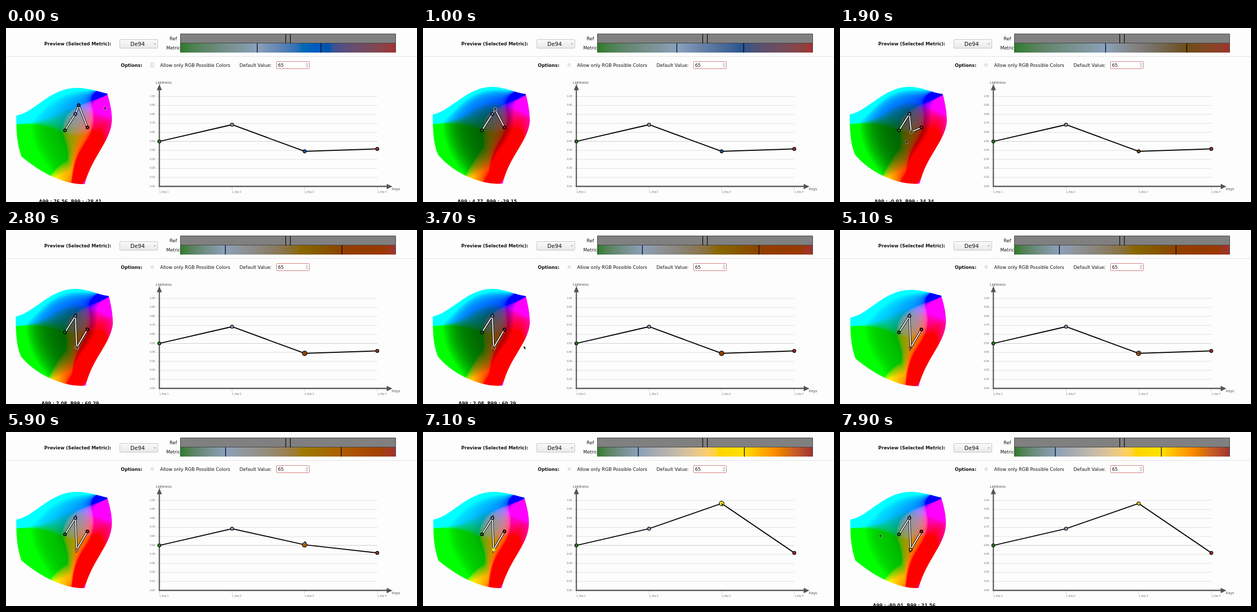
Write an HTML page with a canvas that moves like this. It is 800x340 px and loops after 8 s.

```html
<!DOCTYPE html>
<html lang="en">
<head>
<meta charset="utf-8">
<title>Colour path editor</title>
<style>
  html, body { margin: 0; width: 800px; height: 340px; overflow: hidden; background: #fdfdfd; }
  canvas, svg { position: absolute; left: 0; top: 0; display: block; }
  .ui { font: 8.9px "DejaVu Sans", sans-serif; fill: #111; }
  .bold { font: bold 8.72px "DejaVu Sans", sans-serif; fill: #111; }
  .axis { font: 7.2px "Liberation Sans", Arial, sans-serif; fill: #555; }
  .tick { font: 5.1px "Liberation Sans", Arial, sans-serif; fill: #666; }
</style>
</head>
<body>
<canvas id="paint" width="800" height="340"></canvas>
<svg id="stage" width="800" height="340" viewBox="0 0 800 340">
  <defs>
    <linearGradient id="button" x2="0" y2="1">
      <stop stop-color="#fafafa"/><stop offset="1" stop-color="#e9e9e9"/>
    </linearGradient>
  </defs>

  <path d="M0 55.5H800" stroke="#e2e2e2"/>
  <text class="bold" x="74.5" y="34">Preview (Selected Metric):</text>
  <rect x="221.5" y="22.5" width="74" height="17" rx="1" fill="url(#button)" stroke="#c4c4c4"/>
  <text class="ui" x="242" y="35" style="font-size:10.6px">De94</text>
  <path d="M288 30l1.7 1.7l1.7-1.7" fill="none" stroke="#555" stroke-width=".9"/>

  <text class="ui" x="318.5" y="24">Ref</text>
  <text class="ui" x="312" y="42" style="font-size:8.7px">Metric</text>
  <rect x="340" y="12" width="418" height="18" fill="#808080"/>
  <path d="M339.5 11.5H758.5V48M339.5 11.5V48M340 29.5H758" fill="none" stroke="#444"/>
  <path d="M544.5 12V30M553.5 12V30" stroke="#000" stroke-width="1.2"/>
  <path id="marks" stroke="#000" stroke-width="1.3"/>

  <text class="bold" x="223.5" y="75.5" style="font-size:8.8px">Options:</text>
  <rect id="check" fill="#f4f4f4" stroke="#b5b5b5" stroke-width=".8"/>
  <text class="ui" x="300" y="75.5">Allow only RGB Possible Colors</text>
  <text class="ui" x="454.5" y="75.5">Default Value:</text>
  <rect x="526.5" y="65.5" width="64" height="14" rx="1" fill="#fff" stroke="#cf7b78"/>
  <text class="ui" x="529.5" y="75.5" style="font-size:8.7px">65</text>
  <rect x="583" y="67.5" width="5.5" height="10" fill="#eee"/>
  <path d="M584.3 71.3l1.5-1.7l1.5 1.7M584.3 74l1.5 1.7l1.5-1.7" fill="none" stroke="#888" stroke-width=".8"/>

  <g id="grid"></g>
  <path d="M298.5 119V309.5H743" fill="none" stroke="#555" stroke-width="2.3"/>
  <path d="M298.5 110l5 11.5h-10zM752 309.7l-11 5.3v-10.6z" fill="#555"/>
  <text class="axis" x="291.5" y="108.8">Lightness</text>
  <text class="axis" x="751" y="317">Keys</text>

  <polyline id="curve" fill="none" stroke="#000" stroke-width="2"/>
  <g id="keys"></g>
  <polyline id="pathOuter" fill="none" stroke="#000" stroke-width="4"/>
  <polyline id="pathInner" fill="none" stroke="#fff" stroke-width="2"/>
  <g id="nodes"></g>
  <text id="readout" class="bold" x="125" y="342.3" text-anchor="middle"></text>
  <path id="cursor" d="M-1-3.5v6l1.5-1.2l1 2.2l1.3-.6l-1-2.1h1.9z" fill="#000" stroke="#ddd" stroke-width=".5"/>
</svg>
<script>
const LOOP = 8000, STEP = 100;
const HUB = { x: 136, y: 181, scale: 0.8 };
const BAR = { x: 340, y: 30, w: 418, h: 18 };
const KEY_X = [298.5, 440, 581.3, 722.7];

// Each row: time, then values blended until the next row.
const CURSOR = [
  [0, 192, 157], [600, 142, 152], [900, 141, 151], [1900, 129, 223], [2500, 137.5, 230],
  [3400, 138, 230], [3700, 197, 230], [4200, 330, 242], [4700, 540, 246], [5100, 582, 241],
  [5300, 582, 240], [5900, 582, 216], [6900, 582, 142], [7100, 582, 142], [7400, 400, 168],
  [7700, 130, 198], [7900, 78, 203]
];
const DRAGGED = [[0, 141.5, 151], [800, 141.5, 151], [1300, 139, 172], [1900, 138.7, 203], [2500, 137.5, 230]];
const LIGHT = [[0, .39], [5300, .39], [5900, .507], [6900, .966]];
const MARKS = [
  [0, 489, 613], [800, 489, 613], [1900, 517, 675], [2500, 427, 654],
  [5300, 427, 654], [5900, 427.5, 652.5], [6900, 419, 625.5]
];
const READOUT = [
  [0, 76.56, -28.41], [600, 5.3, -36.2], [900, 5.3, -36.2], [1900, -.03, 34.34],
  [2500, 2.08, 60.29], [7500, 2.08, 60.29], [7600, -8.4, 16.9], [7900, -80.01, 21.56]
];

const OUTLINE_LIGHT = new Path2D("M20 171C55 166 85 117 138 117C160 117 178 124 197 128C203 148 207 165 206 183C203 222 168 250 153 305C110 307 60 277 30 251C21 225 20 200 20 171Z");
const OUTLINE_DARK = new Path2D("M19 169C55 162 85 115 135 115C160 115 180 127 200 129C205 148 208 165 208 183C204 222 168 250 155 304C110 308 55 280 29 247C20 225 19 200 19 169Z");

const $ = id => document.getElementById(id);
const ctx = $("paint").getContext("2d");
const mix = (a, b, k) => a + (b - a) * k;

function track(rows, t) {
  let i = 0;
  while (i < rows.length - 1 && rows[i + 1][0] <= t) i++;
  const a = rows[i], b = rows[i + 1] || a;
  const k = b === a ? 0 : (t - a[0]) / (b[0] - a[0]);
  return a.slice(1).map((v, n) => mix(v, b[n + 1], k));
}

function add(parent, tag, attrs, text = "") {
  const el = document.createElementNS("http://www.w3.org/2000/svg", tag);
  set(el, attrs);
  el.textContent = text;
  return parent.appendChild(el);
}
function set(el, attrs) {
  for (const name in attrs) el.setAttribute(name, attrs[name]);
}

// DIN99d -> Lab -> XYZ -> clamped sRGB
const TURN = 50 * Math.PI / 180;
const unLab = f => f > 6 / 29 ? f ** 3 : 3 * (6 / 29) ** 2 * (f - 4 / 29);
const encode = v => {
  v = Math.min(1, Math.max(0, v));
  return Math.round(255 * (v <= .0031308 ? 12.92 * v : 1.055 * v ** (1 / 2.4) - .055));
};
function toRgb([l99, a99, b99]) {
  const l = (Math.exp(l99 / 325.22) - 1) / .0036;
  const g = (Math.exp(Math.hypot(a99, b99) / 22.5) - 1) / .06;
  const h = Math.atan2(b99, a99) - TURN;
  const e = g * Math.cos(h), f = g * Math.sin(h) / 1.14;
  const a = e * Math.cos(TURN) - f * Math.sin(TURN);
  const b = e * Math.sin(TURN) + f * Math.cos(TURN);
  const fy = (l + 16) / 116;
  const x = .9505 * unLab(fy + a / 500), y = unLab(fy), z = 1.089 * unLab(fy - b / 200);
  return [
    3.2406 * x - 1.5372 * y - .4986 * z,
    -.9689 * x + 1.8758 * y + .0415 * z,
    .0557 * x - .204 * y + 1.057 * z
  ].map(encode);
}
const css = c => `rgb(${toRgb(c)})`;
const colourAt = (x, y, l) => [l * 100, (x - HUB.x) / HUB.scale, (y - HUB.y) / HUB.scale];

function makeGamut(l) {
  const plane = document.createElement("canvas");
  plane.width = 200;
  plane.height = 200;
  const pc = plane.getContext("2d"), img = pc.createImageData(200, 200);
  for (let i = 0; i < 40000; i++) {
    const rgb = toRgb(colourAt(i % 200 + 15.5, Math.floor(i / 200) + 110.5, l));
    img.data.set([...rgb, 255], i * 4);
  }
  pc.putImageData(img, 0, 0);
  return plane;
}
const lightGamut = makeGamut(.65), darkGamut = makeGamut(.39);

function drawGamut(dark) {
  ctx.save();
  ctx.clip(dark ? OUTLINE_DARK : OUTLINE_LIGHT);
  ctx.drawImage(dark ? darkGamut : lightGamut, 15, 110);
  ctx.restore();
}

function drawBar(colours, stops) {
  for (let i = 0; i < BAR.w; i++) {
    const x = BAR.x + i + .5;
    const s = x < stops[1] ? 0 : x < stops[2] ? 1 : 2;
    const k = (x - stops[s]) / (stops[s + 1] - stops[s]);
    ctx.fillStyle = css(colours[s].map((v, n) => mix(v, colours[s + 1][n], k)));
    ctx.fillRect(BAR.x + i, BAR.y, 1, BAR.h);
  }
}

const chartY = l => 309.5 - 175.8 * l;
for (let i = 0; i <= 10; i++) {
  const y = chartY(i / 10);
  add($("grid"), "path", { d: `M293 ${y}H723`, stroke: i === 5 ? "#ccc" : "#dedede" });
  add($("grid"), "text", { class: "tick", x: 290, y: y + 1, "text-anchor": "end" }, (i / 10).toFixed(2));
}
KEY_X.forEach((x, i) => {
  add($("grid"), "path", { d: `M${x} 310V316`, stroke: "#ccc" });
  add($("grid"), "text", { class: "tick", x, y: 322, style: "font-size:4.9px" }, `1_Key ${i + 1}`);
});
const keyDots = KEY_X.map(cx => add($("keys"), "circle", { cx, stroke: "#000" }));
const nodeDots = KEY_X.map(() => add($("nodes"), "circle", {}));

function render(t) {
  const [dx, dy] = track(DRAGGED, t), [light] = track(LIGHT, t);
  const points = [[114.8, 200, .5], [135, 168, .686], [dx, dy, light], [158.5, 194.3, .417]];
  const colours = points.map(p => colourAt(...p));
  const marks = track(MARKS, t);
  const active = t >= 900 && t < 7300;
  const bigKey = t >= 2800 && t < 7300;

  ctx.clearRect(0, 0, 800, 340);
  drawGamut(t >= 900 && t < 4700);
  drawBar(colours, [BAR.x, ...marks, BAR.x + BAR.w]);
  set($("marks"), { d: marks.map(x => `M${x} 30V48`).join("") });

  const line = points.map(p => p.slice(0, 2)).join(" ");
  set($("pathOuter"), { points: line });
  set($("pathInner"), { points: line });
  set($("curve"), { points: points.map((p, i) => [KEY_X[i], chartY(p[2])]).join(" ") });
  points.forEach(([cx, cy, l], i) => {
    const fill = css(colours[i]), picked = i === 2;
    set(keyDots[i], { cy: chartY(l), r: picked && bigKey ? 4.6 : 3.1, fill, "stroke-width": 1.2 });
    const held = picked && active;
    set(nodeDots[i], {
      cx, cy, fill, r: held ? 3.7 : 2.7,
      stroke: held ? "#85807a" : "#000", "stroke-width": held ? 1.2 : 1.6
    });
  });

  const hover = t < 100;
  set($("check"), hover
    ? { x: 282, y: 68, width: 5, height: 8, rx: 1 }
    : { x: 282.2, y: 70, width: 4.6, height: 4.6, rx: 1.5 });

  const [a, b] = track(READOUT, t);
  $("readout").textContent = t < 4000 || t >= 7600 ? `A99 : ${a.toFixed(2)}, B99 : ${b.toFixed(2)}` : "";
  set($("cursor"), { transform: `translate(${track(CURSOR, t)})` });
}

const start = performance.now();
let shown = -1;
function tick() {
  const t = Math.floor((performance.now() - start) % LOOP / STEP) * STEP;
  if (t !== shown) render(shown = t);
  requestAnimationFrame(tick);
}
tick();
</script>
</body>
</html>
```
